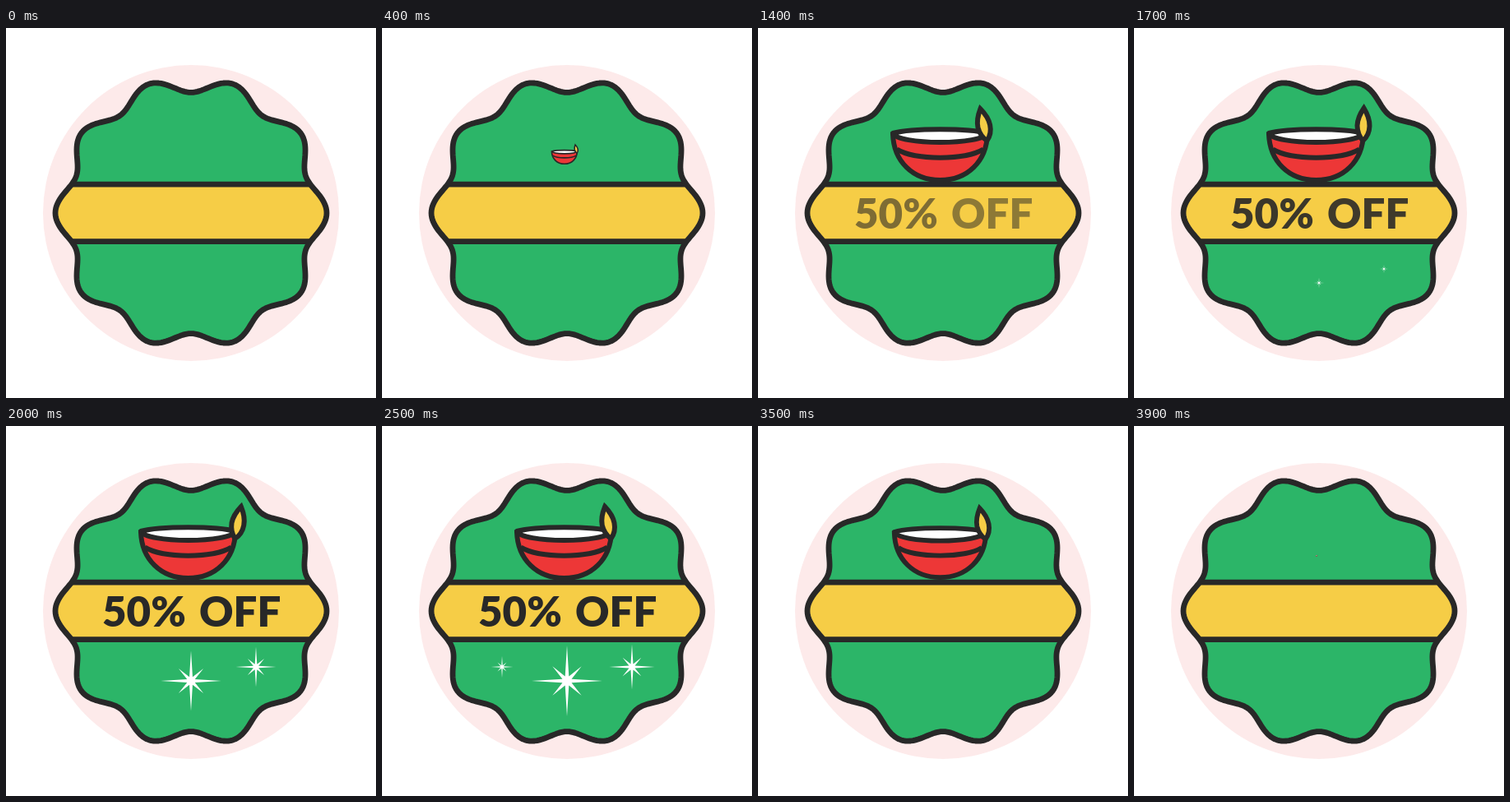
Write an HTML page that moves like this. It is 450 by 450 pixels and loops after 4000 ms.

```html
<!DOCTYPE html>
<html lang="en">
<head>
<meta charset="utf-8">
<title>50% off badge</title>
<style>
  html, body { margin: 0; width: 100%; height: 100%; overflow: hidden; background: #fff; }
  svg { display: block; width: 100vw; height: 100vh; }
  text { font: 900 51px Lato, sans-serif; fill: #282828; }
  .line { stroke: #282828; stroke-width: 6.8; }
  #diya path { stroke: #282828; stroke-width: 6; stroke-linejoin: round; }
  #diya #flame { stroke-linejoin: miter; }
</style>
</head>
<body>
<svg viewBox="0 0 450 450">
  <clipPath id="clip"><path class="badge"/></clipPath>
  <circle cx="225" cy="225" r="180" fill="#fdeaea"/>
  <path class="badge" fill="#2cb568"/>
  <g clip-path="url(#clip)">
    <path class="line" d="M40 190.2H410V259.7H40Z" fill="#f6cd46"/>
  </g>
  <path class="badge line" fill="none" stroke-linejoin="round"/>

  <g id="diya">
    <path d="M164 129C165 162 188 185 221.5 185S278 162 279 129Z" fill="#ed3737"/>
    <path d="M169 147.5C190 161 253 161 274 147.5" fill="none"/>
    <path d="M164 128C186 121.5 257 121.5 279 128C276 135 250 139 221.5 139S167 135 164 128Z" fill="#fff"/>
    <path id="flame" d="M278.5 97.5Q271 109 271 119Q271.5 130 278.5 137Q286 130 286 119Q286 109 278.5 97.5Z" fill="#f6cd46"/>
  </g>

  <text id="amount" x="117" y="243.5">50%</text>
  <text id="off" x="235" y="243.5">OFF</text>
  <g id="stars" fill="#fff"></g>
</svg>
<script>
const LOOP = 4000;
const $ = id => document.getElementById(id);
const ramp = (t, from, to) => Math.min(1, Math.max(0, (t - from) / (to - from)));
const ease = (t, from, to) => (1 - Math.cos(Math.PI * ramp(t, from, to))) / 2;

// Closed path around (x, y) from a radius function of the angle in degrees.
function polar(x, y, step, radius) {
  const points = [];
  for (let a = 0; a < 360; a += step) {
    const r = radius(a), rad = a * Math.PI / 180;
    points.push(`${(x + r * Math.cos(rad)).toFixed(2)} ${(y + r * Math.sin(rad)).toFixed(2)}`);
  }
  return `M${points.join('L')}Z`;
}

const wave = polar(225, 225, 1, a => 155.8 + 9.2 * Math.cos(a * Math.PI / 18));
for (const el of document.querySelectorAll('.badge')) el.setAttribute('d', wave);

const starPath = (x, y, s) => polar(x, y, 22.5, a => s * (a % 45 ? 6 : a % 90 ? 25 : 43));
const stars = [
  { x: 304, y: 293, size: 0.64, grow: [1530, 2130], shrink: [2550, 2980] },
  { x: 225, y: 310, size: 1, grow: [1550, 2150], shrink: [2550, 2980] },
  { x: 146, y: 293, size: 0.64, grow: [2290, 2720], shrink: [2720, 2990] }
];
for (const star of stars) {
  star.el = document.createElementNS('http://www.w3.org/2000/svg', 'path');
  $('stars').append(star.el);
}

function draw(t) {
  const scale = ease(t, 40, 1080) - ease(t, 3445, 3945);
  $('diya').setAttribute('transform', `translate(222 158) scale(${scale}) translate(-222 -158)`);
  const sway = 12 * Math.cos(2 * Math.PI * (t + 70) / 1000);
  $('flame').setAttribute('transform', `rotate(${sway} 278.5 137)`);

  const fade = ramp(t, 3050, 3450);
  $('amount').setAttribute('opacity', ramp(t, 860, 1790) * (1 - fade));
  $('off').setAttribute('opacity', ramp(t, 1000, 1790) * (1 - fade));

  for (const { el, x, y, size, grow, shrink } of stars) {
    const s = size * (ease(t, ...grow) - ease(t, ...shrink));
    el.setAttribute('d', starPath(x, y, s));
  }
}

function tick() {
  draw(performance.now() % LOOP);
  requestAnimationFrame(tick);
}
tick();
</script>
</body>
</html>
```
